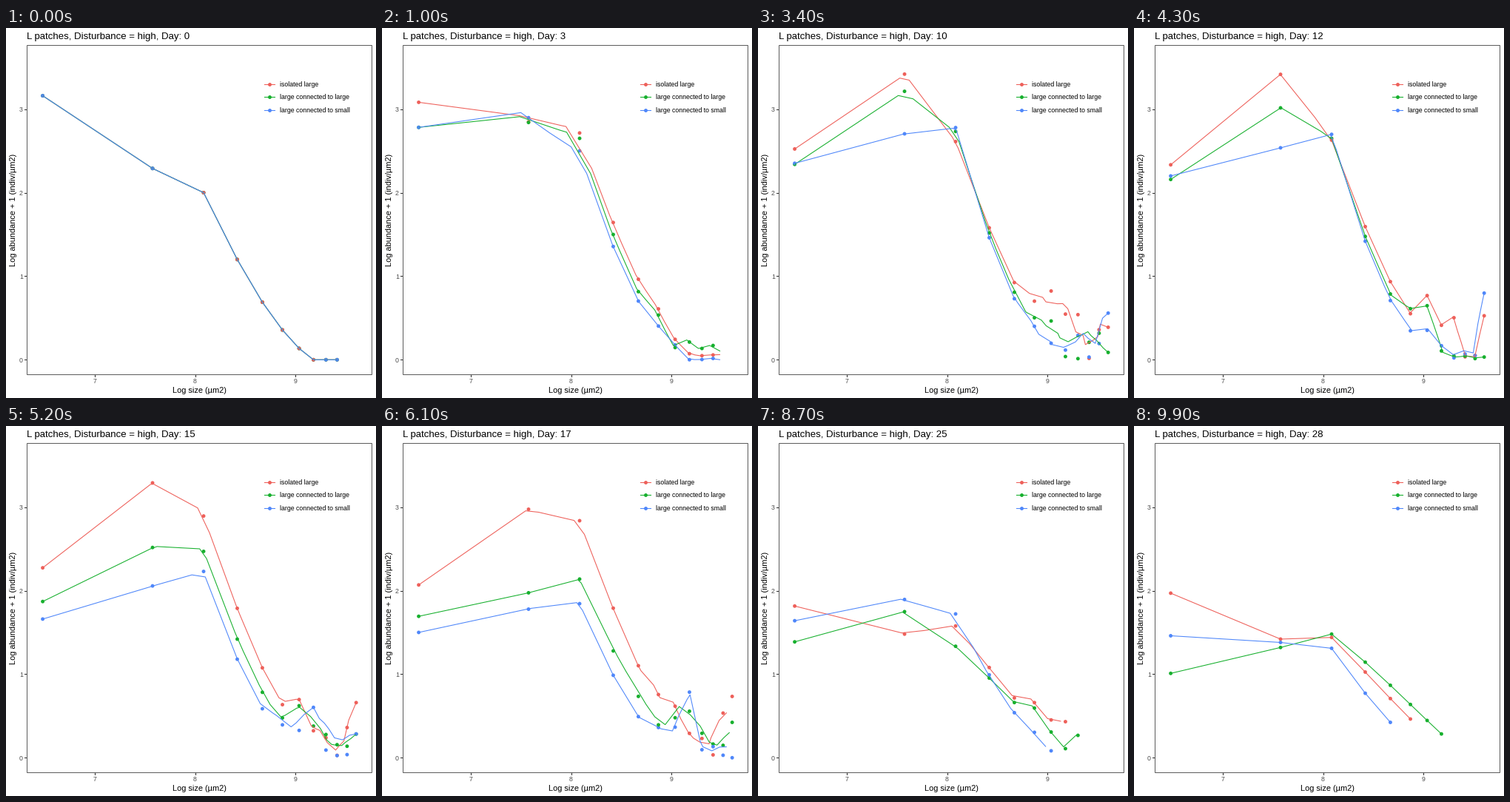
These frames come from a looping animation (500 by 500 pixels, 10 s). A matplotlib script:

```python
import numpy as np
import matplotlib.pyplot as plt
from matplotlib.animation import FuncAnimation
from matplotlib.patches import Rectangle

plt.rcParams["font.family"] = "Liberation Sans"

SIZE, DPI, FRAMES = 500, 100, 100
PX = 72 / DPI  # points per pixel
X_UNIT, Y_UNIT, ZERO = 135.1, 112.9, 448.3
COLORS = ["#ee605a", "#17b02e", "#4f87fa"]
NAMES = ["isolated large", "large connected to large", "large connected to small"]

DAYS, STEP, CLASSES = 28, 4, 12
SIZES = np.log(649.3 * (2 * np.arange(CLASSES) + 1))

# Log abundance of the three smallest classes, every four days after the start
START = (3.16, 2.29, 2.0)
HEADS = [
    [(3.05, 2.66, 2.34, 2.24, 1.64, 1.79, 1.97),
     (3.07, 3.41, 3.43, 3.22, 2.36, 1.49, 1.42),
     (3.00, 2.62, 2.60, 3.04, 2.33, 1.60, 1.44)],
    [(2.63, 2.45, 2.19, 1.71, 1.65, 1.45, 1.01),
     (3.06, 3.32, 3.07, 2.24, 1.31, 1.82, 1.32),
     (2.91, 2.78, 2.67, 2.37, 1.56, 1.31, 1.48)],
    [(2.63, 2.42, 2.26, 1.36, 1.85, 1.67, 1.46),
     (3.14, 2.79, 2.59, 1.79, 1.75, 1.98, 1.38),
     (2.70, 2.80, 2.75, 1.97, 1.53, 1.79, 1.31)],
]
KEEP_END = (0.74, 0.80, 0.62)  # share left per larger class on the last day
KEEP_MID = (0.62, 0.57, 0.54)
EXTRA = (0, 2, -1)  # classes left on the last day, relative to six

rng = np.random.default_rng(12)


def state(k, day):
    """Log abundance per size class: head, geometric decline, noisy tail."""
    head = START if day == 0 else [row[day // STEP - 1] for row in HEADS[k]]
    n = np.arange(1, CLASSES - 2)
    keep = np.interp(day, [0, 4, 14, DAYS], [0.62, KEEP_MID[k], KEEP_MID[k], KEEP_END[k]])
    noise = 0.9 * np.sin(np.pi * day / DAYS) * rng.random(n.size) ** 2
    tail = head[2] * keep ** n - 0.04 * n
    ys = np.concatenate([head, np.maximum(tail, 0) + noise * (n > 2)])
    fade = np.clip((day - 16) / 12, 0, 1)
    count = np.interp(day, [0, 8, 16, DAYS], [10, 12, 12, 6]) + EXTRA[k] * fade
    ys[min(round(count), CLASSES):] = np.nan
    return ys


SERIES = [[state(k, d) for d in range(0, DAYS + 1, STEP)] for k in range(3)]
KEYS = np.rint(np.arange(0, DAYS + 1, STEP) / DAYS * (FRAMES - 1)).astype(int)


def x_px(v):
    return 120.4 + (v - 7) * X_UNIT


def y_px(v):
    return ZERO - v * Y_UNIT


def trace(ys):
    """Nodes of a curve with their relative arc length."""
    ok = ~np.isnan(ys)
    x, y = SIZES[ok], ys[ok]
    s = np.concatenate([[0], np.cumsum(np.hypot(np.diff(x), np.diff(y)))])
    return s / s[-1], x, y


def blend_path(a, b, t):
    sa, xa, ya = trace(a)
    sb, xb, yb = trace(b)
    s = np.union1d(sa, sb)
    mix = lambda p, q: (1 - t) * np.interp(s, sa, p) + t * np.interp(s, sb, q)
    return mix(xa, xb), mix(ya, yb)


def blend_points(a, b, t):
    # leaving points wait for the next key, entering ones appear on it
    return np.where(np.isnan(b), a, a + (b - a) * t)


fig = plt.figure(figsize=(SIZE / DPI, SIZE / DPI), dpi=DPI, facecolor="white")
ax = fig.add_axes([0, 0, 1, 1])
ax.set_xlim(0, SIZE)
ax.set_ylim(SIZE, 0)
ax.axis("off")


def label(x, y, s, size, color="black", **kw):
    return ax.text(x, y, s, fontsize=size * PX, color=color, **kw)


def rule(x, y, color, **kw):
    return ax.plot(x, y, color=color, lw=1.07 * PX, **kw)[0]


DOT = (4.9 * PX) ** 2
INK, GREY = "#333333", "#4d4d4d"

ax.add_patch(Rectangle((28, 23), 466, 445, fill=False, ec="#5c5c5c", lw=PX))
for v in (7, 8, 9):
    rule([x_px(v)] * 2, [469, 471], INK)
    label(x_px(v), 480, v, 8.8, GREY, ha="center")
for v in range(4):
    rule([25, 27], [y_px(v)] * 2, INK)
    label(22.8, y_px(v) + 3.2, v, 8.8, GREY, ha="right")
label(261.3, 493, "Log size (µm2)", 11, ha="center")
label(10, 246, "Log abundance + 1 (indiv/µm2)", 11,
      ha="center", va="center", rotation=90)
title = label(28, 15, "", 13.2)

for i, (name, color) in enumerate(zip(NAMES, COLORS)):
    y = 75.8 + 17.4 * i
    ax.scatter([355.7], [y], s=DOT, c=color, lw=0)
    rule([348.8, 362.6], [y, y], color)
    label(369.5, y + 3.2, name, 8.8)

# stacking of the three series within each size class
ORDER = [(c, k) for c in range(CLASSES)
         for k in ((2, 1, 0) if 2 <= c <= 7 else (0, 1, 2))]
cls, ser = np.array(ORDER).T
dots = ax.scatter(np.zeros(len(cls)), np.zeros(len(cls)), s=DOT,
                  c=[COLORS[k] for k in ser], lw=0, zorder=2)
lines = [rule([], [], c, zorder=3, solid_capstyle="butt") for c in COLORS]


def update(i):
    k = np.searchsorted(KEYS, i, side="right") - 1
    n = min(k + 1, len(KEYS) - 1)
    t = (i - KEYS[k]) / max(KEYS[n] - KEYS[k], 1)
    heights = []
    for rows, line in zip(SERIES, lines):
        x, y = blend_path(rows[k], rows[n], t)
        line.set_data(x_px(x), y_px(y))
        heights.append(blend_points(rows[k], rows[n], t))
    ys = np.array(heights)[ser, cls]
    spots = np.column_stack([x_px(SIZES[cls]), y_px(ys)])
    dots.set_offsets(np.ma.masked_invalid(spots))
    day = round(DAYS * i / (FRAMES - 1))
    title.set_text(f"L patches, Disturbance = high, Day: {day}")
    return [*lines, dots, title]


anim = FuncAnimation(fig, update, frames=FRAMES, interval=100,
                     repeat=True, repeat_delay=0, blit=False)
plt.show()
```
